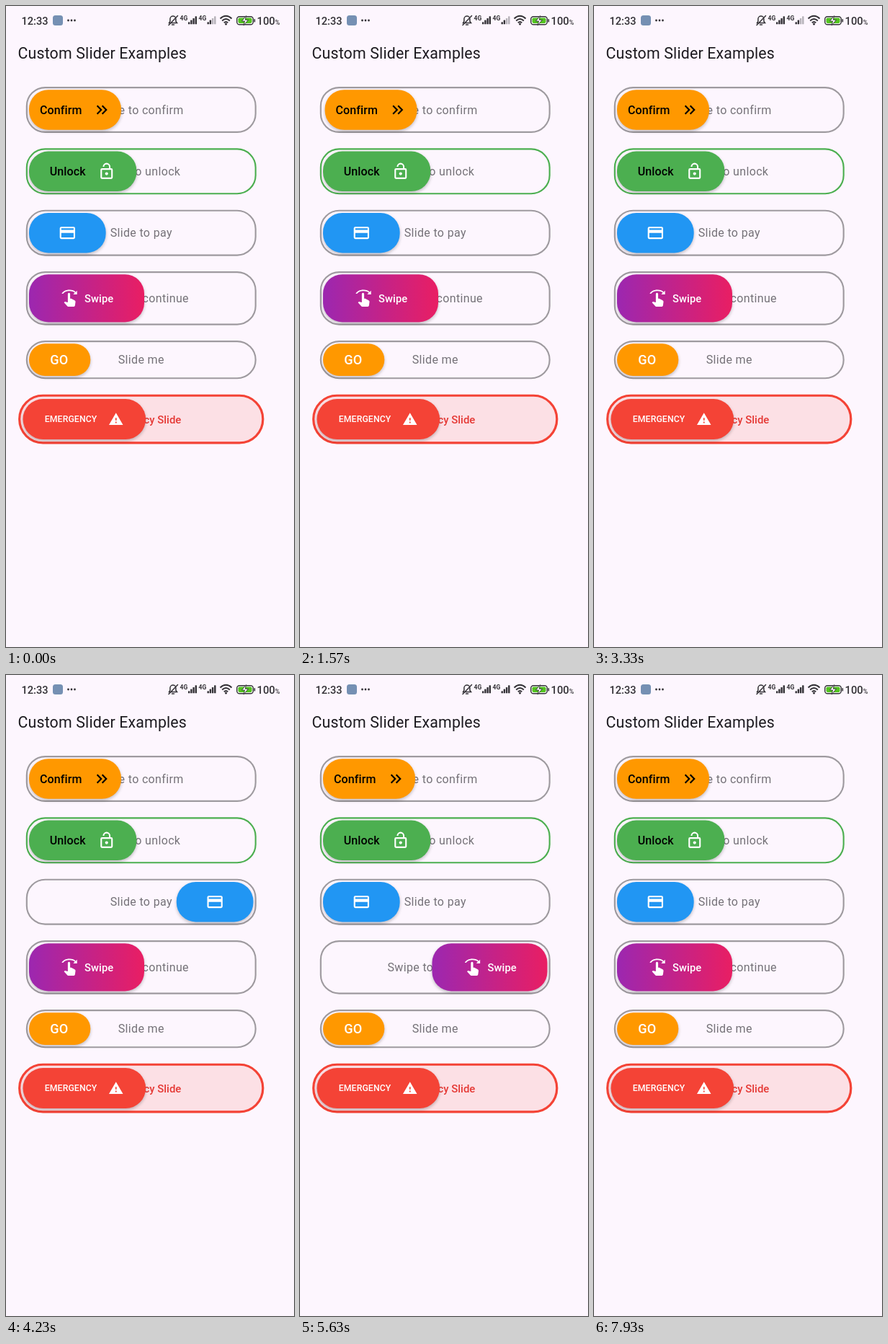
These frames come from a looping animation (400x889 px, 8000 ms). An HTML page:

```html
<!DOCTYPE html>
<html lang="en">
<head>
<meta charset="utf-8">
<title>Custom Slider Examples</title>
<style>
html, body { margin: 0; height: 100%; overflow: hidden; background: #fdf6fe; }
svg { display: block; width: 100vw; height: 100vh; font-family: Roboto, "Noto Sans", sans-serif; }
text { white-space: pre; }
.hint { font-size: 15px; letter-spacing: .32px; text-anchor: middle; fill: #757278; }
.knob { filter: drop-shadow(0 2px 2px rgba(0, 0, 0, .24)); }
</style>
</head>
<body>
<svg viewBox="0 0 400 889">
  <defs>
    <linearGradient id="blend"><stop stop-color="#9c27b0"/><stop offset="1" stop-color="#e91e63"/></linearGradient>
  </defs>
  <g id="status" fill="#333136">
    <text x="21.5" y="25.5" font-size="14.6" font-weight="500">12:33</text>
    <rect x="65" y="13" width="14" height="14" rx="3.5" fill="#7590b3"/>
    <circle cx="86.5" cy="20" r="1.4"/><circle cx="91" cy="20" r="1.4"/><circle cx="95.5" cy="20" r="1.4"/>
    <g fill="none" stroke="#333136" stroke-width="1.5" stroke-linecap="round">
      <path d="M226.5 23.5h11l-1.6-2.2V18a4 4 0 0 0-8 0v3.300zM230.500 26h3M226 26.500L238.500 13.500"/>
    </g>
    <text x="241.500" y="20" font-size="8.500" font-weight="700">4G</text>
    <text x="267.500" y="20" font-size="8.500" font-weight="700">4G</text>
    <g fill="none" stroke="#333136" stroke-width="2">
      <path d="M297.500 17.500q8-7.500 16 0M300.200 20.500q5.300-5 10.600 0M302.800 23.200q2.700-2.500 5.400 0"/>
    </g>
    <circle cx="305.500" cy="25" r="1.500"/>
    <rect x="320.700" y="14.700" width="22.600" height="11" rx="3.500" fill="none" stroke="#333136" stroke-width="1.400"/>
    <rect x="322.500" y="16.500" width="19" height="7.400" rx="1.800" fill="#52c41f"/>
    <rect x="344.500" y="18" width="1.600" height="4.500" rx=".8"/>
    <path d="M333.500 13.500l-6 7.500h4l-1.500 6 6.500-7.800h-4.200z" fill="#fff" stroke="#333136" stroke-width=".9"/>
    <text x="348.500" y="25.500" font-size="14.800" font-weight="500">100<tspan font-size="9">%</tspan></text>
  </g>
  <g id="page" transform="scale(1.06667)">
    <text x="15.500" y="68.500" font-size="20" letter-spacing=".15" fill="#1d1b20">Custom Slider Examples</text>
  </g>
</svg>
<script>
const LOOP = 8000, BLUE = '#2196f3', GREY = '#9e9a9f', RED = '#f44336';
const svgNS = 'http://www.w3.org/2000/svg';
const status = document.getElementById('status'), page = document.getElementById('page');

const icons = {
  arrows: 'M6.41 6L5 7.41 9.58 12 5 16.59 6.41 18l6-6zM13 6l-1.41 1.41L16.17 12l-4.58 4.59L13 18l6-6z',
  lock: 'M12 17a2 2 0 0 0 0-4 2 2 0 0 0 0 4zM18 8h-1V6A5 5 0 0 0 7 6h1.900a3.100 3.100 0 0 1 6.200 0v2H6a2 2 0 0 0-2 2v10a2 2 0 0 0 2 2h12a2 2 0 0 0 2-2V10a2 2 0 0 0-2-2zM18 20H6V10h12z',
  card: 'M20 4H4a2 2 0 0 0-2 2v12a2 2 0 0 0 2 2h16a2 2 0 0 0 2-2V6a2 2 0 0 0-2-2zM20 18H4v-6h16zM20 8H4V6h16z',
  swipe: 'M18.890 14.750l-4.090-2.040c-.28-.14-.58-.21-.89-.21H13v-6a1.500 1.500 0 0 0-3 0v10.740l-3.250-.74c-.33-.07-.68.03-.92.28l-.83.84 4.540 4.790c.38.38 1.140.59 1.670.59h6.160c1 0 1.840-.73 1.980-1.720l.63-4.460c.12-.85-.32-1.690-1.090-2.070zM20.130 3.870C18.690 2.170 15.600 1 12 1 7.500 1 3.600 3 2 6h1.800C5.200 3.900 8.300 2.500 12 2.500c3.370 0 6.070 1.140 7.070 2.430L17 7h5V2z',
  warning: 'M1 21h22L12 2zM13 18h-2v-2h2zM13 14h-2v-4h2z'
};

// times: drag start, end of track reached, release, back home
const sliders = [
  { y: 105, h: 60, w: 120, hint: 'Slide to confirm', color: '#ff9800', drag: BLUE, times: [30, 700, 1100, 1720],
    label: 'Confirm', labelX: 14, size: 15, ink: '#000', icon: 'arrows', iconX: 95 },
  { y: 185, h: 60, w: 140, hint: 'Slide to unlock', color: '#4caf50', drag: BLUE, border: '#4caf50', times: [1750, 2530, 2620, 3150],
    label: 'Unlock', labelX: 27, size: 15, ink: '#000', icon: 'lock', iconX: 101, iconInk: '#fff' },
  { y: 265, h: 60, w: 100, hint: 'Slide to pay', color: BLUE, times: [3360, 4170, 4530, 5060], icon: 'card', iconX: 50 },
  { y: 345, h: 70, w: 150, hint: 'Swipe to continue', color: 'url(#blend)', times: [5080, 5600, 5800, 6400],
    label: 'Swipe', labelX: 72.2, size: 13.8, icon: 'swipe', iconX: 52.5 },
  { y: 435, h: 50, w: 80, hint: 'Slide me', color: '#ff9800', drag: BLUE, times: [6600, 7140, 7350, 7930],
    label: 'GO', labelX: 27.5, size: 17 },
  { x: 16, y: 505, h: 64.5, w: 160, length: 320, line: 3, inset: 6, radius: 32, hint: 'Emergency Slide', color: RED, border: RED,
    fill: 'rgba(244,67,54,.12)', hintStyle: 'font-size:14px;font-weight:500;letter-spacing:0;fill:#e53935',
    label: 'EMERGENCY', labelX: 28.4, size: 11.5, icon: 'warning', iconX: 121.2, iconSize: 20 }
];

function add(parent, tag, attrs, text = '') {
  const node = document.createElementNS(svgNS, tag);
  for (const name in attrs) node.setAttribute(name, attrs[name]);
  node.textContent = text;
  return parent.appendChild(node);
}

function build(s) {
  const { x = 26, y, h, w, length = 300, line = 2, inset = 4, radius = 25, ink = '#fff' } = s;
  const mid = y + h / 2;
  add(page, 'rect', { x: x + line / 2, y: y + line / 2, width: length - line, height: h - line, rx: radius - line / 2,
    fill: s.fill || 'none', stroke: s.border || GREY, 'stroke-width': line });
  add(page, 'text', { class: 'hint', x: x + length / 2, y: mid + 5.3, style: s.hintStyle || '' }, s.hint);
  s.left = x + inset;
  s.travel = length - 2 * inset - w;
  s.group = add(page, 'g', { transform: `translate(${s.left})` });
  s.knob = add(s.group, 'rect', { class: 'knob', y: y + inset, width: w, height: h - 2 * inset, rx: Math.min(radius, h / 2 - inset), fill: s.color });
  if (s.label) add(s.group, 'text', { x: s.labelX, y: mid + s.size * .355, 'font-size': s.size, 'font-weight': 500, 'letter-spacing': .1, fill: ink }, s.label);
  if (s.icon) {
    const scale = (s.iconSize || 24) / 24;
    add(s.group, 'path', { d: icons[s.icon], fill: s.iconInk || ink, 'fill-rule': 'evenodd',
      transform: `translate(${s.iconX} ${mid}) scale(${scale}) translate(-12 -12)` });
  }
}

const weakBars = [];
for (const x of [253, 279.5])
  for (let i = 0; i < 4; i++) {
    const height = 3 + i * 2.7;
    const bar = add(status, 'rect', { x: x + i * 3.2, y: 25.3 - height, width: 2.4, height, rx: .6 });
    if (x > 260 && i > 1) weakBars.push(bar);
  }
sliders.forEach(build);

const clamp = v => Math.max(0, Math.min(1, v));
const easeInOut = p => p < .5 ? 2 * p * p : 1 - 2 * (1 - p) ** 2;

function draw(now) {
  const t = now % LOOP;
  for (const s of sliders) {
    if (!s.times) continue;
    const [start, reach, release, home] = s.times;
    const pos = t < release
      ? easeInOut(clamp((t - start) / (reach - start)))
      : (1 - clamp((t - release) / (home - release))) ** 3;
    s.group.setAttribute('transform', `translate(${s.left + pos * s.travel})`);
    s.knob.setAttribute('fill', s.drag && t > start && t < release ? s.drag : s.color);
  }
  for (const bar of weakBars) bar.setAttribute('fill', t < 3370 ? '#b5b1b8' : '#333136');
}

const origin = performance.now();
function tick() {
  draw(performance.now() - origin);
  requestAnimationFrame(tick);
}
tick();
</script>
</body>
</html>
```
